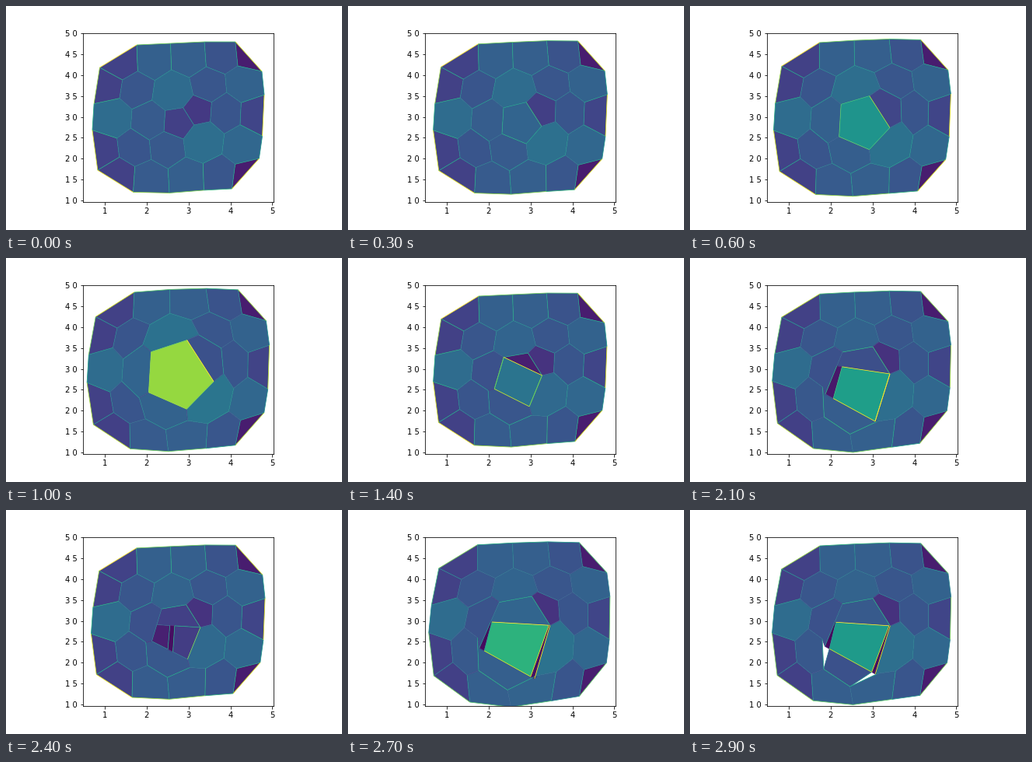
These frames come from a looping animation (432 px wide and 288 px high, 3 s). A matplotlib script:

```python
import numpy as np
import matplotlib.pyplot as plt
from matplotlib.animation import FuncAnimation
from matplotlib.collections import LineCollection, PolyCollection
from matplotlib.tri import Triangulation

W, H = 432, 288
LEFT, RIGHT, TOP, BOTTOM = 99, 344, 35, 252
FRAMES, STEP = 30, 100
FULL_AREA = 5800  # area at the bright end of the colour map

# Cell centres: the rim clockwise, then the inner cells, the growing one last.
RIM = 16
CENTRES = np.array([
    (147, 72), (191, 70), (234, 68), (278, 66), (309, 68), (307, 97),
    (316, 140), (303, 182), (306, 214), (275, 214), (230, 218), (187, 221),
    (145, 216), (127, 185), (136, 143), (132, 104),
    (170, 109), (213, 108), (260, 100), (284, 136), (249, 135),
    (255, 175), (208, 189), (165, 182), (180, 146), (221, 149)], float)
TOP_CELL, RIGHT_CELL, LOW_RIGHT, LOWER, LOW_LEFT, LEFT_CELL, CORE = (
    17, 20, 21, 22, 23, 24, 25)
BASE_A, BASE_B = 10, 11  # rim cells under the lower cell

# The tissue is the dual of a Delaunay mesh, closed by a ring of ghost cells.
rim = CENTRES[:RIM]
ahead = np.roll(rim, -1, axis=0)
along = ahead - rim
normal = np.column_stack([along[:, 1], -along[:, 0]])
normal /= np.hypot(*along.T)[:, None]
nodes = np.vstack([CENTRES, (rim + ahead) / 2 + 63 * normal])

triangles = [frozenset(map(int, t)) for t in Triangulation(*nodes.T).triangles]
triangles = [t for t in triangles if sum(n >= len(CENTRES) for n in t) < 2]
REST = np.array([nodes[list(t)].mean(axis=0) for t in triangles])


def junction(*cells):
    return triangles.index(frozenset(cells))


def around(cell):
    """Vertices of a cell in order of angle."""
    own = [i for i, t in enumerate(triangles) if cell in t]
    x, y = (REST[own] - CENTRES[cell]).T
    return [own[k] for k in np.argsort(np.arctan2(y, x))]


def insert(poly, start, end, new):
    """Put extra vertices on the side from start to end."""
    i, j = poly.index(start), poly.index(end)
    if (i + 1) % len(poly) == j:
        return poly[:i + 1] + new + poly[i + 1:]
    return poly[:j + 1] + new[::-1] + poly[j + 1:]


CELLS = [around(c) for c in range(len(CENTRES))]

# Corners of the growing cell and the points where it is cut.
P = junction(TOP_CELL, LEFT_CELL, CORE)
Q = junction(TOP_CELL, RIGHT_CELL, CORE)
R = junction(RIGHT_CELL, LOW_RIGHT, CORE)
S = junction(LOW_RIGHT, LOWER, CORE)
T = junction(LOWER, LEFT_CELL, CORE)
FOOT = junction(BASE_A, LOW_RIGHT, LOWER)
M, A, B, C, D = range(len(REST), len(REST) + 5)
CORNERS = [P, Q, R, S, T, FOOT]
SWOLLEN = np.array([(196, 121), (235, 114), (257, 149),
                    (238, 210), (174, 175), (241, 210)], float)

QUAD = [A, B, C, D]
DAUGHTERS = [[P, Q, R, B, A, M], [M, A, D, T], [B, R, S, C]]
TORN = [D, C, junction(BASE_A, BASE_B, LOWER), junction(BASE_B, LOWER, LOW_LEFT)]

# Cuts as fractions: M along P-T, A and B along M-R, C and D along T-S.
WHOLE = np.array([0, 0, 1, 1, 0], float)
SLICED = np.array([.33, .1, 1, 1, .16])
PINCHED = np.array([.49, .3, .41, .59, .45])
FRAMED = np.array([.43, .02, .98, .93, .09])

# Each cycle swells from one size to another: first, last, sizes, cuts.
CYCLES = [
    (0, 13, 0, 2300, WHOLE, WHOLE),
    (14, 19, 300, 2000, WHOLE, WHOLE),
    (20, 23, 900, 2000, SLICED, SLICED),
    (24, 27, 330, 1600, PINCHED, FRAMED),
    (28, 29, 900, 1200, FRAMED, FRAMED)]


def mix(a, b, u):
    return a + (b - a) * u


def push(pts, centre, size):
    """Move points outward so that the area between them is kept."""
    v = pts - centre
    return centre + v * np.sqrt(1 + size / (v ** 2).sum(axis=1))[:, None]


def tissue(step):
    """Vertices and cells at one step."""
    n = next(i for i, c in enumerate(CYCLES) if step <= c[1])
    first, last, small, big, cut0, cut1 = CYCLES[n]
    u = ((step - first) / (last - first)) ** 1.35
    size = mix(small, big, u)
    pts = push(REST, (212, 185) if n else (224, 149), size)
    if n:
        pts[CORNERS] = mix(REST[CORNERS], SWOLLEN, np.sqrt(size / 1150))

    m, a, b, c, d = mix(cut0, cut1, u)
    split = mix(pts[P], pts[T], m)
    upper = [mix(split, pts[R], f) for f in (a, b)]
    lower = [mix(pts[T], pts[S], f) for f in (c, d)]
    pts = np.vstack([pts, split, *upper, *lower])

    cells = list(CELLS)
    if n:
        cells[LEFT_CELL] = insert(cells[LEFT_CELL], P, T, [M])
        cells[LOWER] = insert(cells[LOWER], T, S, [D, C])
        cells[CORE:] = DAUGHTERS + [QUAD]
    if n == len(CYCLES) - 1:
        cells[LOWER] = TORN
    return pts, cells


def area(poly):
    x, y = poly.T
    return abs(np.dot(x, np.roll(y, -1)) - np.dot(y, np.roll(x, -1))) / 2


fig = plt.figure(figsize=(W / 72, H / 72), dpi=72, facecolor="white")
ax = fig.add_axes([LEFT / W, 1 - BOTTOM / H, (RIGHT - LEFT) / W, (BOTTOM - TOP) / H])
ax.set_xlim(LEFT, RIGHT)
ax.set_ylim(BOTTOM, TOP)
ax.set_xticks([126.8 + 53.9 * k for k in range(5)], [str(k + 1) for k in range(5)])
ax.set_yticks([250 - 26.85 * k for k in range(9)],
              [f"{1 + k / 2:.1f}".replace(".", " ") for k in range(9)])
ax.tick_params(labelsize=10, labelfontfamily="DejaVu Sans")

viridis = plt.get_cmap("viridis")
fills = ax.add_collection(PolyCollection([], edgecolors="none"))
lines = ax.add_collection(LineCollection([], linewidths=0.8))


def draw(step):
    pts, cells = tissue(step)
    polys = [pts[c] for c in cells]
    fills.set_verts(polys)
    fills.set_facecolor(viridis([area(p) / FULL_AREA for p in polys]))

    # Long edges are bright and lie on top.
    edges = {tuple(sorted(e)) for c in cells for e in zip(c, c[1:] + c[:1])}
    segs = pts[np.array(sorted(edges))]
    size = np.hypot(*(segs[:, 1] - segs[:, 0]).T)
    order = np.argsort(size)
    order = order[size[order] > 0.5]
    lines.set_segments(segs[order])
    lines.set_color(viridis(size[order] / size.max()))
    return fills, lines


anim = FuncAnimation(fig, draw, frames=FRAMES, interval=STEP, repeat=True)
plt.show()
```
